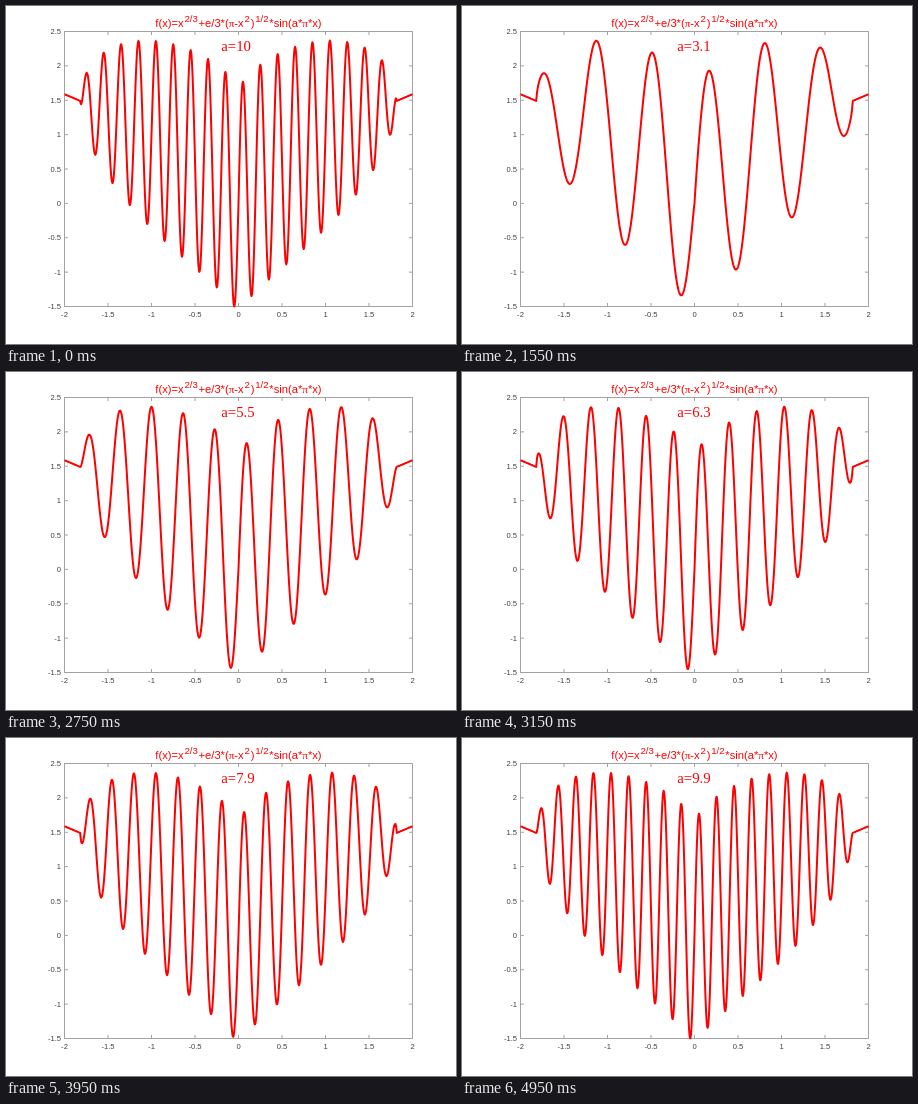
Animation of 450x338 px, one loop 5 s. Source, as an HTML page:

```html
<!DOCTYPE html>
<html lang="en">
<head>
<meta charset="utf-8">
<title>Heart curve</title>
<style>
  html, body { margin: 0; width: 100%; height: 100%; overflow: hidden; background: #fff; }
  svg { display: block; width: 450px; height: 338px; }
  text { white-space: pre; }
  .title { font: 11.2px "Liberation Sans", Arial, sans-serif; fill: #f00; }
  .sup { font-size: 9.6px; }
  .pi, .value { font-family: "Liberation Serif", "Times New Roman", serif; }
  .value { font-size: 14.8px; fill: #f00; }
  .labels { font: 7.6px "Liberation Sans", Arial, sans-serif; fill: #404040; }
  .axes { fill: none; stroke: #a2a2a2; stroke-width: 1; }
  .curve { fill: none; stroke: #f00; stroke-width: 2; stroke-linejoin: round; }
</style>
</head>
<body>
<svg viewBox="0 0 450 338">
  <path class="axes" id="axes"/>
  <g class="labels" id="labels"></g>
  <path class="curve" id="curve"/>
  <text class="title" x="149.3" y="20.8">f(x)=x<tspan class="sup" dx=".8" dy="-5">2/3</tspan><tspan dx=".8" dy="5">+e/3*(</tspan><tspan class="pi">π</tspan>-x<tspan class="sup" dx=".8" dy="-5">2</tspan><tspan dx=".8" dy="5">)</tspan><tspan class="sup" dx=".8" dy="-5">1/2</tspan><tspan dx=".8" dy="5">*sin(a*</tspan><tspan class="pi">π</tspan>*x)</text>
  <text class="value" id="value" x="215.3" y="45"></text>
</svg>
<script>
  const STEP = 50, COUNT = 100;
  const LEFT = 58.5, RIGHT = 406.5, TOP = 25.5, BOTTOM = 300.5, TICK = 3.5;
  const $ = id => document.getElementById(id);
  const px = x => LEFT + (x + 2) * (RIGHT - LEFT) / 4;
  const py = y => BOTTOM - (y + 1.5) * (BOTTOM - TOP) / 4;

  function addLabel(text, x, y, anchor) {
    const el = document.createElementNS("http://www.w3.org/2000/svg", "text");
    el.setAttribute("x", x);
    el.setAttribute("y", y);
    el.setAttribute("text-anchor", anchor);
    el.textContent = text;
    $("labels").append(el);
  }

  function drawAxes() {
    let d = `M${LEFT} ${TOP}H${RIGHT}V${BOTTOM}H${LEFT}Z`;
    for (let i = 0; i <= 8; i++) {
      const vx = i / 2 - 2, vy = i / 2 - 1.5, x = px(vx), y = py(vy);
      d += `M${x} ${BOTTOM}v${-TICK}M${x} ${TOP}v${TICK}`;
      d += `M${LEFT} ${y}h${TICK}M${RIGHT} ${y}h${-TICK}`;
      addLabel(vx, x, 311, "middle");
      addLabel(vy, 55, y + 2.6, "end");
    }
    $("axes").setAttribute("d", d);
  }

  const heart = (x, a) =>
    Math.cbrt(x * x) + 0.9 * Math.sqrt(Math.max(0, 3.3 - x * x)) * Math.sin(a * Math.PI * x);

  function drawCurve(a) {
    const points = [];
    for (let i = -400; i <= 400; i++) {
      const x = i / 200;
      points.push(px(x).toFixed(2) + " " + py(heart(x, a)).toFixed(2));
    }
    $("curve").setAttribute("d", "M" + points.join("L"));
    $("value").textContent = "a=" + a;
  }

  let shown = -1;
  function tick() {
    const n = Math.floor(performance.now() / STEP) % COUNT;
    if (n !== shown) {
      shown = n;
      drawCurve((n || COUNT) / 10);
    }
    requestAnimationFrame(tick);
  }

  drawAxes();
  tick();
</script>
</body>
</html>
```
